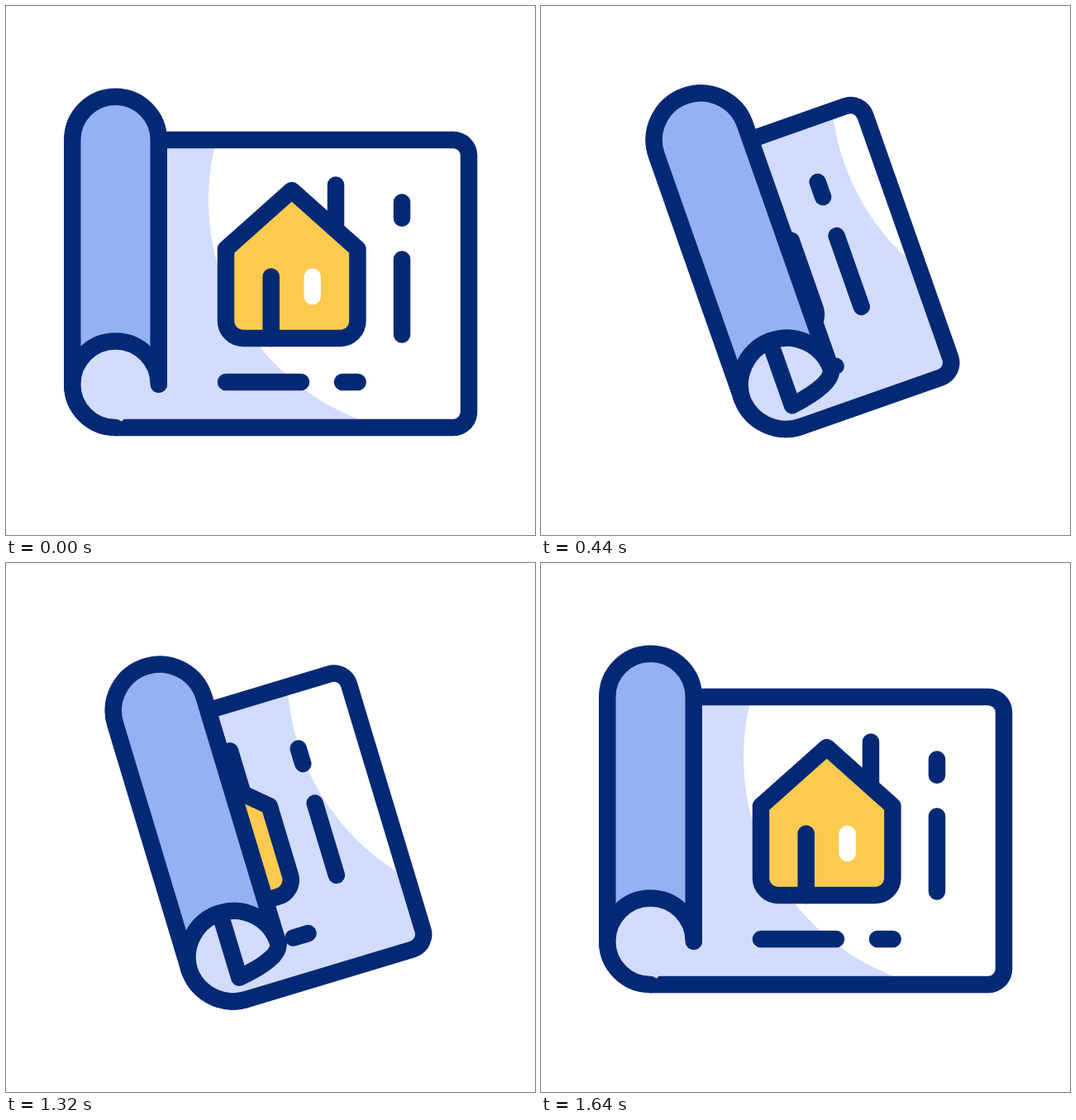
Write an HTML page that moves like this. It is 640 by 640 pixels and loops after 2000 ms.

```html
<!DOCTYPE html>
<html lang="en">
<head>
<meta charset="utf-8">
<title>Blueprint roll</title>
<style>
  html, body { margin: 0; width: 100%; height: 100%; overflow: hidden; background: #fff; }
  svg { display: block; width: 100%; height: 100%; }
  .ink { stroke: #032975; stroke-width: 20.5; stroke-linecap: round; stroke-linejoin: round; }
</style>
</head>
<body>
<svg viewBox="0 0 640 640">
  <defs>
    <clipPath id="sheetClip"><path id="sheetShape"/></clipPath>
    <clipPath id="outside"><rect x="132.5" y="100" width="500" height="440"/></clipPath>
  </defs>
  <g id="plan">
    <path id="paper" fill="#d2dcfd"/>
    <g clip-path="url(#sheetClip)"><circle id="glow" r="284" fill="#fff"/></g>
    <path id="edge" class="ink" fill="none"/>
    <g clip-path="url(#outside)">
      <g id="drawing" class="ink" fill="none">
        <path d="M399 216.5V268"/>
        <path fill="#fdca50" d="M266 294L345.7 223L425.4 294V381A21 21 0 0 1 404.4 402H287A21 21 0 0 1 266 381Z"/>
        <path d="M320.7 327.5V402"/>
        <path stroke="#fff" style="stroke:#fff" d="M370.7 327.7V351"/>
        <path d="M479 237.5V256.7M479 306.5V397.5M266 455H357M407 455H425.7"/>
      </g>
    </g>
    <path id="tube" class="ink" fill="#94b1f4"/>
    <path id="curl" class="ink" fill="#d2dcfd"/>
  </g>
</svg>
<script>
const LOOP = 2000, STEP = 40, MOVE = 520, ROLL_AT = 80, UNROLL_AT = 1120;
const CX = 132.5, TOP = 162, BOTTOM = 510;
const el = id => document.getElementById(id);
const set = (id, attrs) => {
  for (const name in attrs) el(id).setAttribute(name, attrs[name]);
};
const clamp = v => Math.min(1, Math.max(0, v));
const smooth = v => v * v * (3 - 2 * v);

function draw(t) {
  const a = clamp((t - ROLL_AT) / MOVE);
  const b = clamp((t - UNROLL_AT) / MOVE);
  const p = smooth(a) - smooth(b);

  // Hop while rolling up, small dip while opening again
  const hop = 29 * smooth(1 - Math.abs(2 * a - 1));
  const dip = 2.4 * Math.sin(Math.PI * clamp((b - 0.385) / 0.615));
  const x = 86.9 * p, y = 48.8 * p - hop + dip;
  set('plan', { transform: `translate(${x} ${y}) rotate(${-25 * p} ${CX} ${TOP})` });

  const r = 52.25 + 5.75 * p;
  const left = CX - r, right = CX + r;
  const shift = 297 * p, end = 560 - shift;

  const sheet = `M${CX} ${TOP}H${end - 19}a19 19 0 0 1 19 19V${BOTTOM - 19}` +
    `a19 19 0 0 1 -19 19H${CX}A${r} ${r} 0 0 1 ${left} ${BOTTOM - r}`;
  for (const id of ['paper', 'sheetShape', 'edge']) set(id, { d: sheet });
  set('glow', { cx: 529 + 54 * p, cy: 235 - 11 * p });
  set('drawing', { transform: `translate(${-shift} 0)` });

  const rim = TOP - 25 * p, mouth = 457.75 - 1.5 * p;
  set('tube', { d: `M${left} ${mouth}V${rim}A${r} ${r} 0 0 1 ${right} ${rim}V${mouth}` });

  // Inner end of the paper slides along the inside of the roll
  const k = 1 - (1 - p) ** 3;
  const tipX = 184.75 - 55 * k;
  const tipY = 457.75 + 24.5 * (1 - (1 - k) ** 4);
  const bendY = mouth + (tipY - mouth) * 0.7;
  const roof = mouth - Math.sqrt(Math.max(0, r * r - (tipX - CX) ** 2));
  set('curl', {
    d: `M${CX} ${BOTTOM}A${r} ${r} 0 0 1 ${left} ${BOTTOM - r}V${mouth}` +
      `A${r} ${r} 0 0 1 ${right} ${mouth}Q${right - 4 * k} ${bendY} ${tipX} ${tipY}V${roof}`
  });
}

const start = performance.now();
function tick() {
  const t = Math.max(0, performance.now() - start) % LOOP;
  draw(Math.floor((t + 2) / STEP) * STEP);
  requestAnimationFrame(tick);
}
tick();
</script>
</body>
</html>
```
